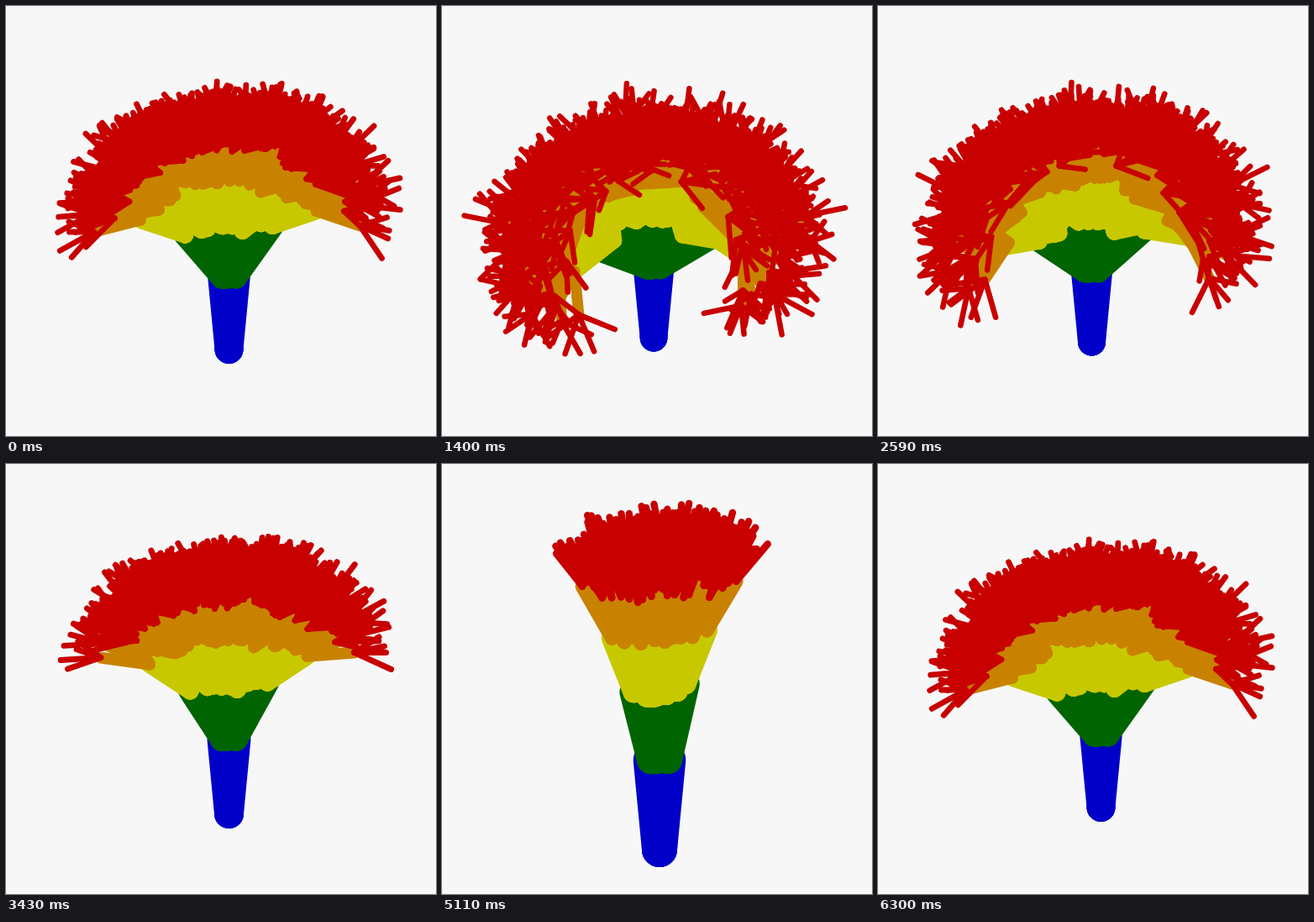
An HTML page with a canvas that plays this animation: 512x512 px, repeating every 6.37 s.

```html
<!DOCTYPE html>
<html lang="en">
<head>
<meta charset="utf-8">
<title>Branching fan</title>
<style>
  html, body { margin: 0; width: 100%; height: 100%; overflow: hidden; background: #f7f7f7; }
  canvas { display: block; width: 512px; height: 512px; }
</style>
</head>
<body>
<canvas id="stage" width="512" height="512"></canvas>
<script>
const ctx = document.getElementById('stage').getContext('2d');
const STEP = 70, STEPS = 91, FORKS = 4;
const RAD = Math.PI / 180;

// Trunk to tips: colour, stroke width, mean length, length variation
const LEVELS = [
  { color: '#0000c8', width: 42, length: 109, vary: 0.03 },
  { color: '#006400', width: 33.6, length: 87, vary: 0.14 },
  { color: '#c8c800', width: 25.2, length: 74, vary: 0.18 },
  { color: '#c88200', width: 16.8, length: 61, vary: 0.2 },
  { color: '#c80000', width: 8.4, length: 48, vary: 0.38 }
];

// Camera by swing: [swing, root x, root y, scale]
const CAMERA = [
  [-1, 258, 462.5, 1.02],
  [-0.927, 259, 459, 1],
  [-0.743, 262, 442, 0.945],
  [-0.276, 265.5, 416.5, 0.83],
  [0, 265.5, 409, 0.806],
  [0.53, 254.5, 400, 0.786],
  [1, 252, 395, 0.776]
];

function seeded(seed) {
  return () => {
    seed = (seed + 0x6D2B79F5) | 0;
    let h = Math.imul(seed ^ (seed >>> 15), 1 | seed);
    h = (h + Math.imul(h ^ (h >>> 7), 61 | h)) ^ h;
    return ((h ^ (h >>> 14)) >>> 0) / 4294967296;
  };
}

function growTree() {
  const random = seeded(29);
  const jitter = amount => (random() * 2 - 1) * amount;
  let parents = [null];
  return LEVELS.map(({ length, vary }, depth) => {
    const lean = depth === 1 ? -0.1 : 0;
    const branches = [];
    for (const parent of parents) {
      for (let i = 0; i < FORKS; i++) {
        const even = i / (FORKS - 1) * 2 - 1;
        branches.push({
          parent,
          turn: even + lean + (depth ? jitter(depth === 1 ? 0.05 : 0.2) : 0),
          length: length * (1 + jitter(vary))
        });
      }
    }
    parents = branches;
    return branches;
  });
}

function cameraAt(swing) {
  let i = 1;
  while (i < CAMERA.length - 1 && swing > CAMERA[i][0]) i++;
  const a = CAMERA[i - 1], b = CAMERA[i];
  const p = (swing - a[0]) / (b[0] - a[0]);
  return a.map((v, k) => v + (b[k] - v) * p);
}

const tree = growTree();
const root = { x: 0, y: 0, angle: 0 };

function draw(step) {
  const swing = Math.sin(step / (STEPS - 1) * Math.PI * 2);
  const [, x, y, scale] = cameraAt(swing);
  const spread = (32 + 26 * swing) * RAD;

  ctx.setTransform(1, 0, 0, 1, 0, 0);
  ctx.fillStyle = '#f7f7f7';
  ctx.fillRect(0, 0, 512, 512);
  ctx.setTransform(scale, 0, 0, scale, x, y);
  ctx.lineCap = 'round';

  tree.forEach((branches, depth) => {
    ctx.strokeStyle = LEVELS[depth].color;
    ctx.lineWidth = LEVELS[depth].width;
    const fan = depth ? spread : 5.5 * RAD;
    for (const branch of branches) {
      const from = branch.parent || root;
      branch.angle = from.angle + branch.turn * fan;
      branch.x = from.x + Math.sin(branch.angle) * branch.length;
      branch.y = from.y - Math.cos(branch.angle) * branch.length;
      ctx.beginPath();
      ctx.moveTo(from.x, from.y);
      ctx.lineTo(branch.x, branch.y);
      ctx.stroke();
    }
  });
}

const start = performance.now();
let shown = -1;

function tick() {
  const step = Math.floor((performance.now() - start) / STEP) % STEPS;
  if (step !== shown) draw(shown = step);
  requestAnimationFrame(tick);
}
tick();
</script>
</body>
</html>
```
